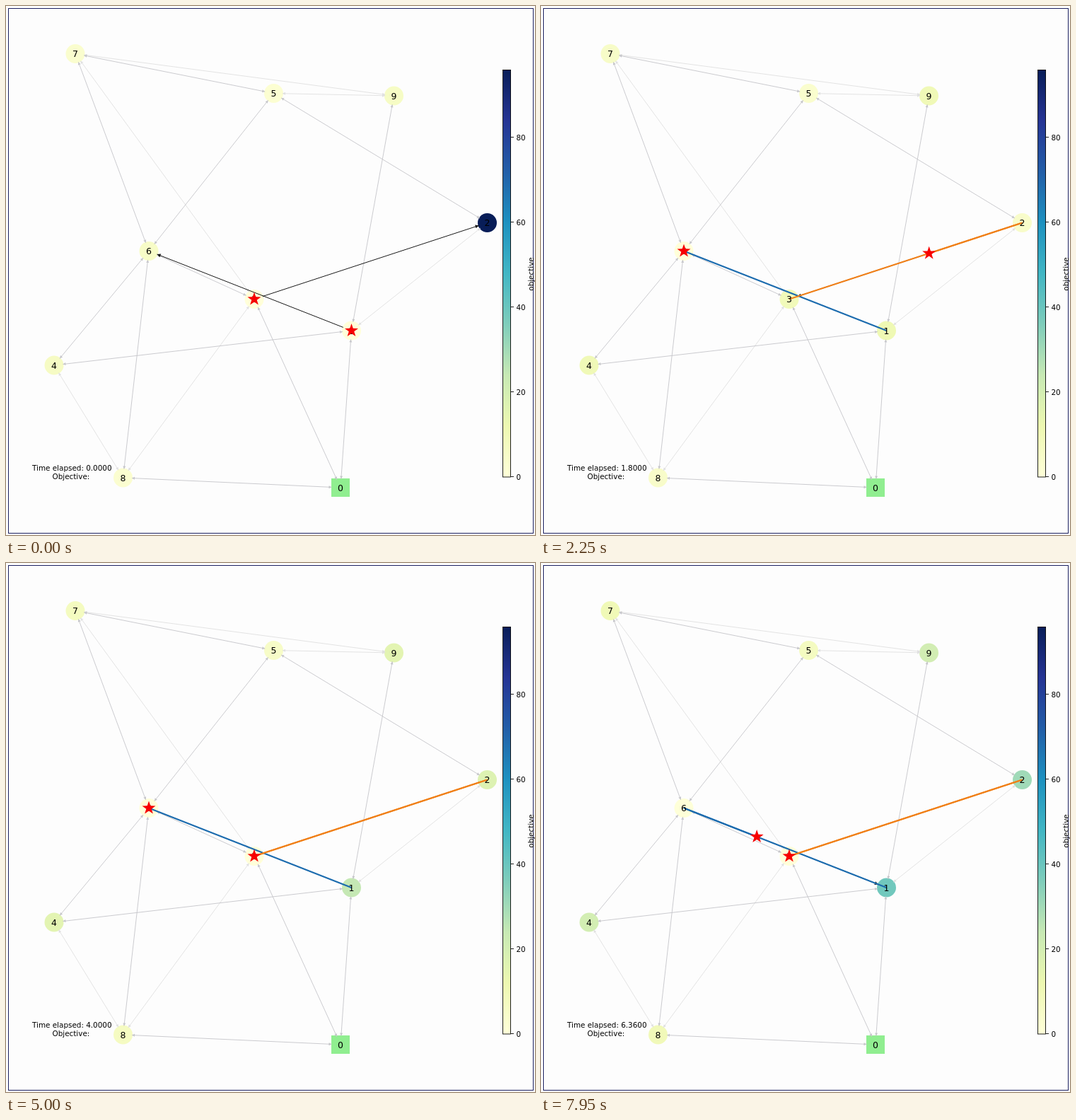
Animation of 748x748 px, one loop 8000 ms. Source, as an HTML page with a canvas:

```html
<!DOCTYPE html>
<html lang="en">
<head>
<meta charset="utf-8">
<title>Graph patrol</title>
<style>
  html, body { margin: 0; width: 100%; height: 100%; overflow: hidden; background: #fdfdfd; }
  canvas { display: block; width: 748px; height: 748px; }
</style>
</head>
<body>
<canvas id="stage" width="748" height="748"></canvas>
<script>
const ctx = document.getElementById('stage').getContext('2d');
const LOOP = 8000, STEP = 50, TIME_PER_STEP = 0.04;
const MAX_VALUE = 96, NODE_RADIUS = 13.5;
const INK = '#0a0a0a';

// YlGnBu colour map
const palette = ['ffffd9', 'edf8b1', 'c7e9b4', '7fcdbb', '41b6c4', '1d91c0', '225ea8', '253494', '081d58']
  .map(hex => [0, 2, 4].map(i => parseInt(hex.slice(i, i + 2), 16)));

// Position, starting value and growth per time unit, indexed by label
const nodes = [
  { x: 473, y: 681 },
  { x: 488.5, y: 459, start: 0, rate: 6.1 },
  { x: 680.5, y: 306.5, start: 96, rate: 5.7 },
  { x: 351, y: 414.5, start: 0, rate: 5.2 },
  { x: 68, y: 508, start: 6.3, rate: 2.2 },
  { x: 378.5, y: 123.5, start: 2, rate: 0.8 },
  { x: 202, y: 346.5, start: 5.5, rate: 1 },
  { x: 98, y: 67.5, start: 3.2, rate: 1.1 },
  { x: 165.5, y: 667, start: 2.6, rate: 1.1 },
  { x: 548.5, y: 127, start: 6, rate: 2.3 },
];
const strongEdges = '75 76 56 52 91 63 64 68 41 80 30 10'.split(' ');
const faintEdges = '79 73 59 21 83 48'.split(' ');

const agents = [
  { color: '#1b6bae', trips: [{ from: 1, to: 6, leave: 0, arrive: 1 }, { from: 6, to: 1, leave: 6, arrive: 7 }] },
  { color: '#f08019', trips: [{ from: 3, to: 2, leave: 0, arrive: 1 }, { from: 2, to: 3, leave: 1, arrive: 3 }] },
];

function colorOf(value) {
  const s = Math.min(1, Math.max(0, value / MAX_VALUE)) * (palette.length - 1);
  const i = Math.min(Math.floor(s), palette.length - 2);
  const rgb = palette[i].map((c, k) => Math.round(c + (palette[i + 1][k] - c) * (s - i)));
  return `rgb(${rgb})`;
}

// A visit resets a node, which stays at zero until the agent leaves.
function valueOf(id, time) {
  let { start, rate } = nodes[id], since = 0;
  for (const { trips } of agents) {
    trips.forEach((trip, i) => {
      if (trip.to !== id || time < trip.arrive) return;
      const next = trips[i + 1];
      start = 0;
      since = next ? next.leave : Infinity;
    });
  }
  return start + rate * Math.max(0, time - since);
}

function line(a, b, color, width) {
  ctx.strokeStyle = color;
  ctx.lineWidth = width;
  ctx.beginPath();
  ctx.moveTo(a.x, a.y);
  ctx.lineTo(b.x, b.y);
  ctx.stroke();
}

function text(string, x, y, size, align = 'center') {
  ctx.font = `${size}px "DejaVu Sans", sans-serif`;
  ctx.textAlign = align;
  ctx.fillStyle = '#000';
  ctx.fillText(string, x, y);
}

function mix(a, b, f) {
  return { x: a.x + (b.x - a.x) * f, y: a.y + (b.y - a.y) * f };
}

function arrowHead(tip, angle, color, size) {
  ctx.save();
  ctx.translate(tip.x, tip.y);
  ctx.rotate(angle);
  ctx.fillStyle = color;
  ctx.beginPath();
  ctx.moveTo(0, 0);
  ctx.lineTo(-size, -size * 0.5);
  ctx.lineTo(-size, size * 0.5);
  ctx.fill();
  ctx.restore();
}

function edge(from, to, color, width, headSize, bothWays) {
  const a = nodes[from], b = nodes[to];
  const gap = 12.5 / Math.hypot(b.x - a.x, b.y - a.y);
  const start = mix(a, b, gap), end = mix(b, a, gap);
  const angle = Math.atan2(b.y - a.y, b.x - a.x);
  line(start, end, color, width);
  arrowHead(end, angle, color, headSize);
  if (bothWays) arrowHead(start, angle + Math.PI, color, headSize);
}

function star({ x, y }) {
  ctx.fillStyle = '#f80000';
  ctx.beginPath();
  for (let i = 0; i < 10; i++) {
    const r = i % 2 ? 3.9 : 10;
    const angle = i * Math.PI / 5 - Math.PI / 2;
    ctx.lineTo(x + r * Math.cos(angle), y + r * Math.sin(angle));
  }
  ctx.fill();
}

function drawColorBar() {
  const left = 703, top = 90, bottom = 666, width = 11;
  const gradient = ctx.createLinearGradient(0, bottom, 0, top);
  palette.forEach((rgb, i) => gradient.addColorStop(i / (palette.length - 1), `rgb(${rgb})`));
  ctx.fillStyle = gradient;
  ctx.fillRect(left, top, width, bottom - top);
  ctx.strokeStyle = INK;
  ctx.lineWidth = 0.9;
  ctx.strokeRect(left - 0.5, top + 0.5, width, bottom - top - 0.5);
  for (let v = 0; v <= 80; v += 20) {
    const y = bottom - v * 6;
    line({ x: 714, y: y - 0.5 }, { x: 718, y: y - 0.5 }, INK, 0.9);
    text(v, 721.5, y + 3.8, 10.4, 'left');
  }
  ctx.save();
  ctx.translate(746, 379);
  ctx.rotate(-Math.PI / 2);
  text('objective', 0, 0, 10.4);
  ctx.restore();
}

function drawNode(id, time) {
  const { x, y } = nodes[id];
  if (id === 0) {
    ctx.fillStyle = '#90ee90';
    ctx.fillRect(x - 13, y - 13, 26, 26);
    return;
  }
  ctx.fillStyle = colorOf(valueOf(id, time));
  ctx.beginPath();
  ctx.arc(x, y, NODE_RADIUS, 0, Math.PI * 2);
  ctx.fill();
}

function draw(time) {
  ctx.fillStyle = '#fdfdfd';
  ctx.fillRect(0, 0, 748, 748);
  ctx.strokeStyle = '#1c2060';
  ctx.lineWidth = 1;
  ctx.strokeRect(3.5, 3.5, 742, 742);

  nodes.forEach((_, id) => drawNode(id, time));
  for (const [a, b] of faintEdges) edge(a, b, '#e0e0e0', 0.9, 4, true);
  for (const [a, b] of strongEdges) edge(a, b, '#c6c6ca', 0.9, 4, true);

  const started = agents.map(({ trips }) => trips.filter(trip => time >= trip.leave));
  for (const trips of started) {
    const trip = trips[trips.length - 1];
    if (time < trip.arrive) edge(trip.from, trip.to, '#181818', 1, 5, false);
  }
  const stars = agents.map(({ color }, i) => {
    let position;
    for (const { from, to, leave, arrive } of started[i]) {
      position = mix(nodes[from], nodes[to], Math.min(1, (time - leave) / (arrive - leave)));
      line(nodes[from], position, color, 2);
    }
    return position;
  });

  nodes.forEach(({ x, y }, id) => text(id, x, y + 4.5, 12.5));
  stars.forEach(star);
  text('Time elapsed: ' + time.toFixed(4), 37, 657, 10.4, 'left');
  text('Objective:', 65.5, 668.7, 10.4, 'left');
  drawColorBar();
}

const origin = performance.now();
function frame() {
  const step = Math.floor((performance.now() - origin) % LOOP / STEP);
  draw(Math.round(step * TIME_PER_STEP * 100) / 100);
  requestAnimationFrame(frame);
}
frame();
</script>
</body>
</html>
```
